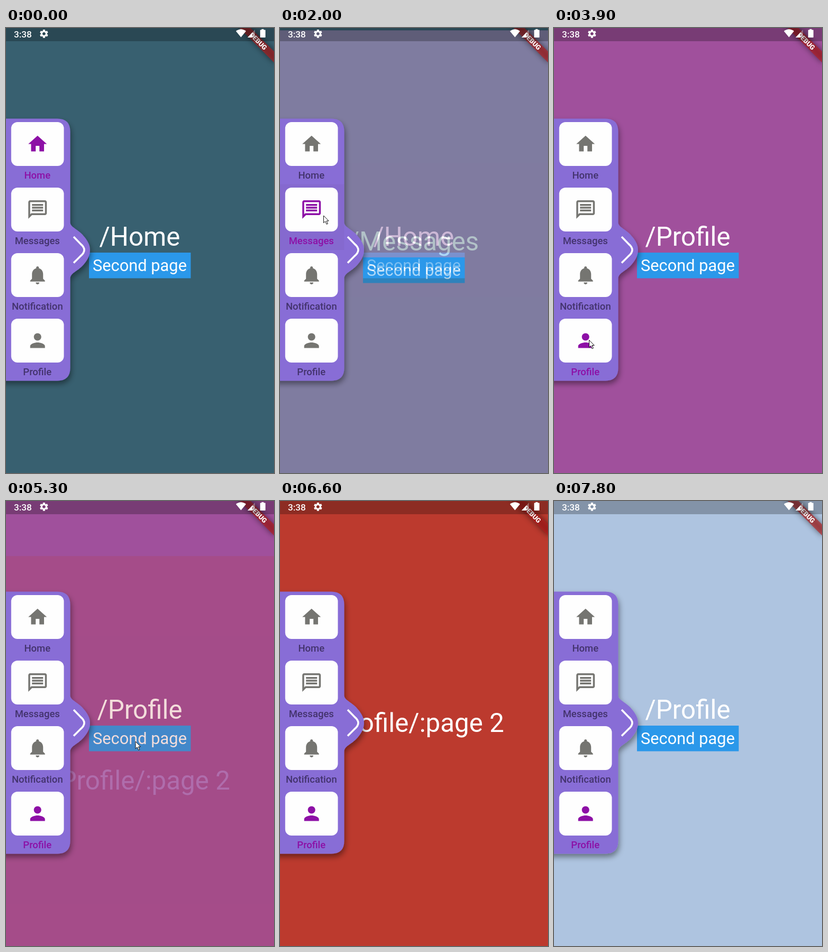
These frames come from a looping animation (507x842 px, 8000 ms). An HTML page:

```html
<!DOCTYPE html>
<html lang="en">
<head>
<meta charset="utf-8">
<title>Side menu navigation</title>
<style>
  html, body { margin: 0; width: 100%; height: 100%; overflow: hidden; background: #386070; }
  svg { display: block; width: 100vw; height: 100vh; font-family: Roboto, sans-serif; }
  .title { font-size: 49.3px; fill: #fff; text-anchor: middle; }
  .action { font-size: 30.8px; fill: #fff; text-anchor: middle; }
  .label { font-size: 18.5px; font-weight: 500; text-anchor: middle; fill: #43336d; }
  .icon { fill: #757571; }
  .on .label, .on .icon { fill: #8d10a6; }
  .clock { font-size: 17.2px; font-weight: 500; }
  .debug { font-size: 12.6px; font-weight: 900; fill: #fff; text-anchor: middle; }
</style>
</head>
<body>
<svg viewBox="0 0 507 842" preserveAspectRatio="none">
  <defs>
    <filter id="shade" x="-30%" y="-10%" width="170%" height="125%">
      <feDropShadow dx="2" dy="6" stdDeviation="5.5" flood-color="#000" flood-opacity=".42"/>
    </filter>
    <filter id="blur" x="-30%" y="-200%" width="160%" height="500%">
      <feGaussianBlur stdDeviation="4.6"/>
    </filter>
    <clipPath id="panelClip"><path d="M0 171.500H97Q121.500 171.500 121.500 196V643Q121.500 667.500 97 667.500H0Z"/></clipPath>
  </defs>

  <g id="pages"></g>

  <path filter="url(#shade)" fill="#886dd6" d="M-30 171.500H97Q121.500 171.500 121.500 196V368
    C122 378 137 380 149 396C156 405 159 412 159 420C159 428 156 436 149 445C137 461 122 462 121.500 474
    V643Q121.500 667.500 97 667.500H-30Z"/>
  <path d="M128 395L141 408.500Q155 420 141 431.500L128 444.500" fill="none" stroke="#fff" stroke-width="3.6"/>
  <g clip-path="url(#panelClip)"><g id="ripples" fill="#4a3050"></g></g>
  <g id="menu"></g>

  <g transform="translate(507 -4.6) rotate(45) scale(1.233)">
    <rect x="-40" y="28" width="80" height="12" opacity=".5" filter="url(#blur)"/>
    <rect x="-40" y="28" width="80" height="12" fill="#b71c1c" fill-opacity=".627"/>
  </g>
  <text class="debug" transform="translate(507 -4.6) rotate(45)" y="46.400">DEBUG</text>

  <rect width="507" height="25" opacity=".25"/>
  <g fill="#fff">
    <text class="clock" x="15" y="17.500">3:38</text>
    <path transform="translate(62 1) scale(.82)" d="M19.140 12.940c.04-.3.06-.61.06-.94 0-.32-.02-.64-.07-.94l2.030-1.580c.18-.14.23-.41.12-.61l-1.920-3.320c-.12-.22-.37-.29-.59-.22l-2.390.96c-.5-.38-1.030-.7-1.620-.94l-.36-2.540c-.04-.24-.24-.41-.48-.41h-3.840c-.24 0-.43.17-.47.41l-.36 2.540c-.59.24-1.130.57-1.620.94l-2.390-.96c-.22-.08-.47 0-.59.22L2.740 8.870c-.12.21-.08.47.12.61l2.030 1.580c-.05.3-.09.63-.09.94s.02.64.07.94l-2.030 1.580c-.18.14-.23.41-.12.61l1.920 3.320c.12.22.37.29.59.22l2.390-.96c.5.38 1.030.7 1.620.94l.36 2.540c.05.24.24.41.48.41h3.840c.24 0 .44-.17.47-.41l.36-2.540c.59-.24 1.130-.56 1.620-.94l2.390.96c.22.08.47 0 .59-.22l1.920-3.320c.12-.22.07-.47-.12-.61zM12 15.600c-1.980 0-3.600-1.620-3.600-3.600s1.620-3.600 3.600-3.600 3.600 1.620 3.600 3.600-1.620 3.600-3.600 3.600z"/>
    <path d="M435 6Q444.500-1.500 454 6L444.500 17.500Z"/>
    <path d="M457 18H471V3Z" opacity=".3"/>
    <path d="M457 18H466V8.400Z"/>
    <path d="M483.500 2h4v1.500h2.500q.8 0 .8.8v13q0 .8-.8.8h-8.400q-.8 0-.8-.8v-13q0-.8.8-.8h1.900z"/>
  </g>

  <path id="cursor" fill="#fff" stroke="#111" d="M.5.5V14.200L3.700 11.300 6.100 16.800 8.400 15.800 6 10.500H10.200Z"/>
</svg>

<script>
const LOOP = 8000, TICK = 100, PUSH = 380, POP_AT = 7600, POP = 200, RISE = 212;
const $ = id => document.getElementById(id);

const pages = [
  { title: '/Home', fill: '#386070', start: -PUSH },
  { title: '/Messages', fill: '#ad8dbe', start: 1717 },
  { title: '/Profile', fill: '#a0509c', start: 3460 },
  { title: '/Profile/:page 2', fill: '#bc3a2e', start: 5169, plain: true }
];

const items = [
  ['Home', 'M10 20v-6h4v6h5v-8h3L12 3 2 12h3v8z'],
  ['Messages', 'M4 4h16v12H5.170L4 17.170V4m0-2c-1.100 0-1.990.9-1.990 2L2 22l4-4h14c1.100 0 2-.9 2-2V4c0-1.100-.9-2-2-2H4zm2 10h12v2H6v-2zm0-3h12v2H6V9zm0-3h12v2H6V6z'],
  ['Notification', 'M12 22c1.100 0 2-.9 2-2h-4c0 1.100.89 2 2 2zm6-6v-5c0-3.070-1.640-5.640-4.500-6.320V4c0-.83-.67-1.500-1.500-1.500s-1.500.67-1.500 1.500v.68C7.630 5.360 6 7.920 6 11v5l-2 2v1h16v-1l-2-2z'],
  ['Profile', 'M12 12c2.210 0 4-1.790 4-4s-1.790-4-4-4-4 1.790-4 4 1.790 4 4 4zm0 2c-2.670 0-8 1.340-8 4v2h16v-2c0-2.660-5.330-4-8-4z']
];

const taps = [
  { start: 1605, x: 83, y: 355, row: 1 },
  { start: 3365, x: 66, y: 590, row: 3 }
];

// time, x, y; the pointer rests at each stop
const stops = [
  [600, 59, 455], [800, 88, 371], [1000, 82, 354.5],
  [2600, 96, 400], [2700, 98, 470], [2800, 90, 530], [2900, 78, 567],
  [3100, 73, 580], [3200, 66, 590],
  [4300, 110, 622], [4400, 205, 637], [4500, 300, 632], [4600, 340, 585],
  [4700, 300, 505], [4800, 244.5, 454.5],
  [6100, 195, 600], [6200, 128.5, 731], [6400, 106.5, 832], [6600, 0, 900]
];

$('pages').innerHTML = pages.map(p => `<g>
  <rect y="-4.6" width="507" height="849" fill="${p.fill}"/>
  <text class="title" x="253" y="${p.plain ? 437 : 412}">${p.title}</text>
  ${p.plain ? '' : `<rect x="157" y="425" width="192.500" height="48.500" fill="#2b98ea"/>
  <text class="action" x="253" y="459.500">Second page</text>`}</g>`).join('');

$('menu').innerHTML = items.map(([name, icon], i) => `<g transform="translate(0 ${i * 124})">
  <rect x="9.800" y="178" width="99.700" height="83" rx="12" fill="#fefefe"/>
  <path class="icon" transform="translate(38.700 198.500) scale(1.75)" d="${icon}"/>
  <text class="label" x="59.300" y="284.500">${name}</text></g>`).join('');

$('ripples').innerHTML = taps.map(({ x, y, row }, i) => `
  <clipPath id="row${i}"><rect y="${171.5 + row * 124}" width="121.500" height="124.500"/></clipPath>
  <circle cx="${x}" cy="${y}" clip-path="url(#row${i})"/>`).join('');

const layers = [...$('pages').children];
const rows = [...$('menu').children];
const circles = [...$('ripples').querySelectorAll('circle')];
const clamp = v => Math.min(1, Math.max(0, v));

// cubic-bezier(x1, 0, x2, 1), solved by bisection
const bezier = (x1, x2) => t => {
  let lo = 0, hi = 1, s = .5;
  for (let i = 0; i < 24; i++, s = (lo + hi) / 2) {
    const x = 3 * s * (1 - s) ** 2 * x1 + 3 * s * s * (1 - s) * x2 + s ** 3;
    if (x < t) lo = s; else hi = s;
  }
  return s * s * (3 - 2 * s);
};
const slide = bezier(.4, .2), fade = bezier(.42, 1);

function render(t) {
  pages.forEach((p, i) => {
    const popping = p.plain && t >= POP_AT;
    const k = clamp(popping ? 1 - (t - POP_AT) / POP : (t - p.start) / PUSH);
    const g = layers[i];
    g.style.display = k > 0 ? '' : 'none';
    g.setAttribute('opacity', k < 1 ? fade(k) : 1);
    g.setAttribute('transform', `translate(0 ${k < 1 ? RISE * (1 - slide(k)) : 0})`);
  });
  layers[2].firstElementChild.setAttribute('fill', t > POP_AT ? '#aec4e0' : pages[2].fill);

  const active = t < 1700 ? 0 : t < 3500 ? 1 : 3;
  rows.forEach((row, i) => row.setAttribute('class', i === active ? 'on' : ''));

  taps.forEach(({ start }, i) => {
    const age = t - start;
    circles[i].setAttribute('r', Math.min(115, Math.max(0, age * .43)));
    circles[i].setAttribute('opacity', age > 0 ? .17 * clamp((480 - age) / 280) : 0);
  });

  const stop = stops.filter(s => s[0] <= t).pop();
  $('cursor').style.display = stop ? '' : 'none';
  if (stop) $('cursor').setAttribute('transform', `translate(${stop[1]} ${stop[2]})`);
}

// The picture advances ten times a second
const origin = performance.now();
function frame() {
  const t = (performance.now() - origin) % LOOP;
  render(Math.floor(t / TICK) * TICK);
  requestAnimationFrame(frame);
}
frame();
</script>
</body>
</html>
```
